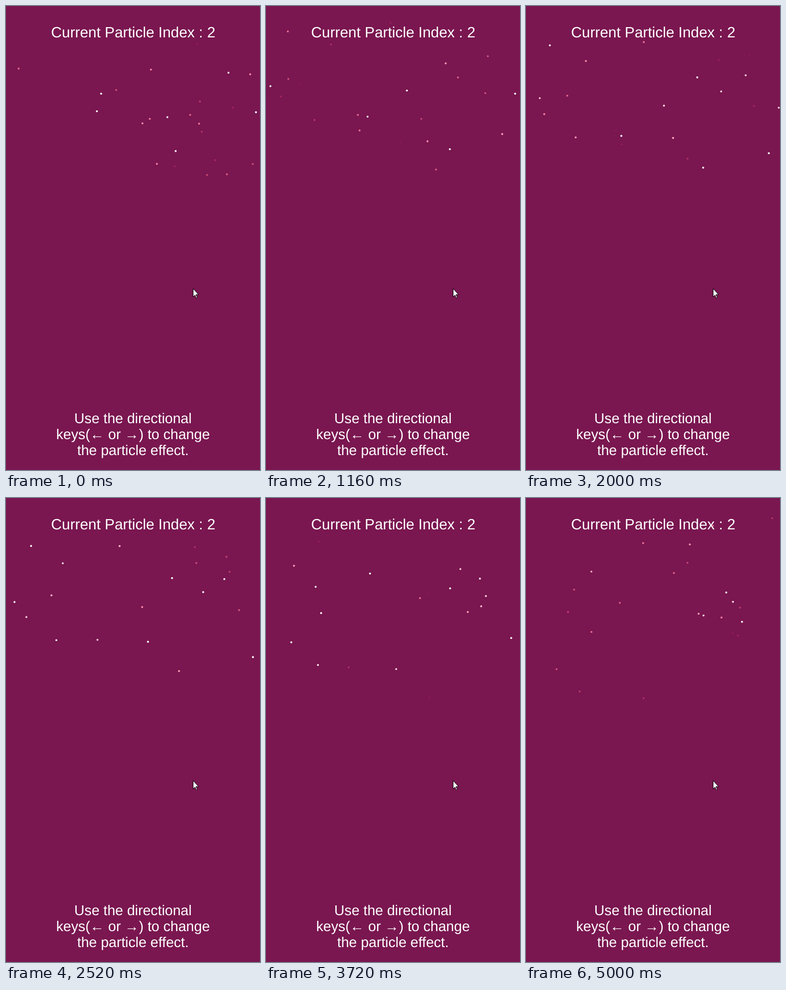
Animation of 496x902 px, one loop 5.04 s. Source, as an HTML page with a canvas:

```html
<!DOCTYPE html>
<html>
<head>
<meta charset="utf-8">
<style>
  html, body { margin: 0; width: 496px; height: 902px; overflow: hidden; background: #7a1650; }
  canvas, svg { position: absolute; left: 0; top: 0; }
  text {
    font: 27.7px "Liberation Sans", Arial, sans-serif;
    fill: #fff; text-anchor: middle; text-rendering: geometricPrecision;
  }
  .title { font-size: 29px; }
  .arrow { font-family: "Liberation Serif", serif; }
</style>
</head>
<body>
<canvas width="496" height="902"></canvas>
<svg width="496" height="902">
  <text class="title" x="248.5" y="61">Current Particle Index : 2</text>
  <text x="248" y="811">Use the directional</text>
  <text x="248" y="842">keys(<tspan class="arrow">←</tspan> or <tspan class="arrow">→</tspan>) to change</text>
  <text x="248" y="873">the particle effect.</text>
  <path d="M365.5 549.5v16l3.5-3.5 2.5 5.5 2-1-2.5-5.5h5z" fill="#fff" stroke="#000"/>
</svg>
<script>
const LOOP = 5040, STEP = 40, LIFE = 5000, FADE = 2000, GAP = 100;
const ctx = document.querySelector('canvas').getContext('2d');

let seed = 7;
function random(min, max) {
  seed = (seed * 16807) % 2147483647;
  return min + (max - min) * seed / 2147483647;
}

// Particles born one after another, GAP ms apart; speeds in px per second.
function burst(first, count) {
  return Array.from({ length: count }, (_, i) => ({
    born: first + i * GAP,
    x: random(0, 496), y: random(15, 205),
    vx: random(-20, 20), vy: random(28, 46)
  }));
}

const particles = [
  burst(-4800, 12), burst(-3050, 6), burst(-1300, 6), burst(-300, 2),
  burst(100, 10), burst(1650, 5), burst(3500, 11)
].flat();

// Red saturates first, so a fading dot turns pink before it disappears.
function glow(level) {
  const soft = level ** 1.5;
  return `rgb(${Math.min(255, 122 + 210 * level)}, ${22 + 233 * soft}, ${80 + 175 * soft})`;
}

function draw(t) {
  ctx.clearRect(0, 0, 496, 902);
  for (const p of particles) {
    const age = t - p.born;
    const level = Math.min(1, age / FADE, (LIFE - age) / FADE);
    if (level <= 0) continue;
    const seconds = age / 1000;
    ctx.fillStyle = glow(level);
    ctx.beginPath();
    ctx.arc(p.x + p.vx * seconds, p.y + p.vy * seconds, 1.9, 0, 2 * Math.PI);
    ctx.fill();
  }
}

const start = performance.now();
function tick() {
  const t = (performance.now() - start) % LOOP;
  draw(Math.floor(t / STEP) * STEP);
  requestAnimationFrame(tick);
}
tick();
</script>
</body>
</html>
```
